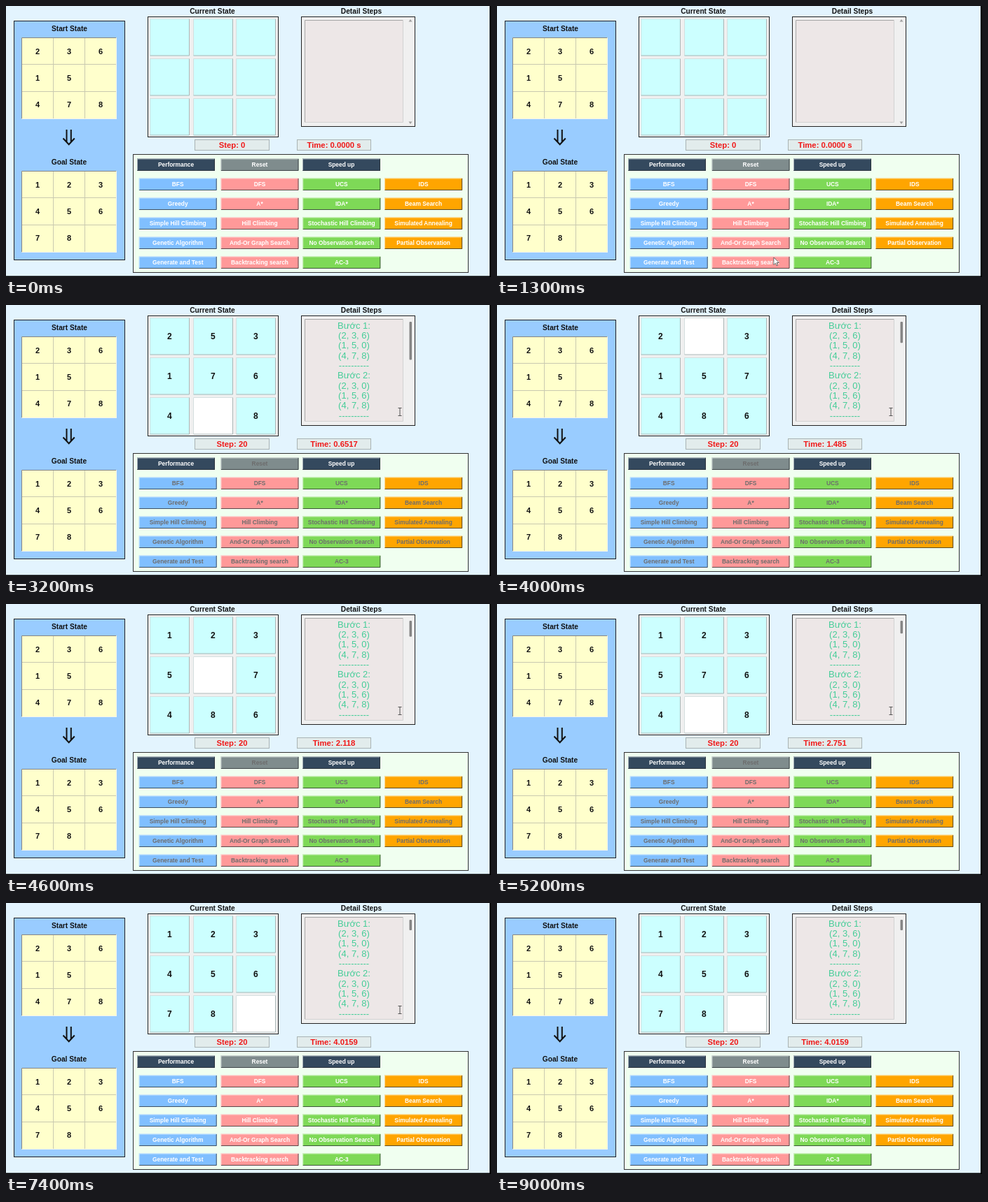
Animation of 692x388 px, one loop 9.2 s. Source, as an HTML page:

```html
<!DOCTYPE html>
<html lang="en">
<head>
<meta charset="utf-8">
<title>8-puzzle solver</title>
<style>
html, body { margin: 0; width: 100%; height: 100%; overflow: hidden; background: #e3f4fe; }
svg { display: block; width: 692px; height: 388px; }
text { font-family: "Liberation Sans", Arial, sans-serif; text-anchor: middle; font-weight: bold; white-space: pre; }
.plain { font-weight: normal; }
</style>
</head>
<body>
<svg id="stage" viewBox="0 0 692 388"></svg>
<script>
const NS = "http://www.w3.org/2000/svg";
const stage = document.getElementById("stage");
const LOOP = 9200, CLICK = 2000, DONE = 6500;

function add(tag, attrs, parent = stage) {
  const el = document.createElementNS(NS, tag);
  for (const name in attrs) el.setAttribute(name, attrs[name]);
  parent.appendChild(el);
  return el;
}
function box(x, y, width, height, fill, stroke) {
  return stroke
    ? add("rect", { x: x + .5, y: y + .5, width: width - 1, height: height - 1, fill, stroke })
    : add("rect", { x, y, width, height, fill });
}
function label(str, x, y, size, fill = "#111", parent = stage) {
  const el = add("text", { x, y: y + size * .36, "font-size": size, fill }, parent);
  el.textContent = str;
  return el;
}
function line(d, stroke, width = 1) {
  return add("path", { d, stroke, "stroke-width": width, fill: "none" });
}
// Two-tone edge: first colour top and left, second bottom and right.
function bevel(x, y, w, h, a, b) {
  const l = x + .5, t = y + .5, r = x + w - .5, u = y + h - .5;
  line(`M${l} ${u}V${t}H${r}`, a);
  line(`M${l} ${u}H${r}V${t}`, b);
}

box(0, 0, 692, 388, "#e3f4fe");
box(690, 0, 2, 388, "#000");
box(0, 386.5, 692, 1.5, "#000");

// Start and goal boards
function smallGrid(y, cells) {
  box(22, y, 136, 117, "#ffffcc");
  for (const x of [67.5, 112.5]) line(`M${x} ${y}v117`, "#c9c9b0");
  for (const dy of [38.5, 77.5]) line(`M22 ${y + dy}h136`, "#c9c9b0");
  bevel(22, y, 136, 117, "#858585", "#f4f4ee");
  cells.forEach((n, i) => {
    if (n) label(n, 45 + i % 3 * 45, y + 19.8 + Math.floor(i / 3) * 38.2, 11);
  });
}
const start = [2, 3, 6, 1, 5, 0, 4, 7, 8];
box(11, 21, 159, 343, "#99ccff", "#222");
label("Start State", 90.5, 32, 10.2);
smallGrid(45, start);
line("M86.5 177V194.5M92.8 177V194.5M81.5 189.5L89.7 198.3L97.8 189.5", "#111", 2);
label("Goal State", 90, 223.5, 10.2);
smallGrid(236, [1, 2, 3, 4, 5, 6, 7, 8, 0]);

// Current board
label("Current State", 294.5, 7.5, 10.2);
box(202, 15, 187, 173, "#f0f0f0", "#222");
const tiles = start.map((_, i) => {
  const x = [205, 267, 328][i % 3], y = 18 + Math.floor(i / 3) * 57;
  const face = box(x, y, 57, 53.5, "#ccffff");
  bevel(x, y, 57, 53.5, "#d5dfdf", "#a9b5b5");
  return { face, num: label("", x + 28.3, y + 26.7, 12) };
});

// Detail list
label("Detail Steps", 507, 7.5, 10.2);
box(421, 15, 163, 158, "#f0f0f0", "#222");
box(426, 20, 141, 147, "#ede7e7");
bevel(426, 20, 141, 147, "#a6a6a6", "#d2d2d2");
const arrows = add("path", { d: "M574.5 22.5L577 19L579.5 22.5ZM574.5 165.5L577 169L579.5 165.5Z", fill: "#a0a0a0" });
const thumb = add("rect", { x: 575.5, y: 24, width: 3.5, rx: 1, fill: "#858585" });
const blocks = [
  ["Bước 1:", "(2, 3, 6)", "(1, 5, 0)", "(4, 7, 8)", "----------"],
  ["Bước 2:", "(2, 3, 0)", "(1, 5, 6)", "(4, 7, 8)", "----------"]
].map((rows, b) => {
  const g = add("g", { class: "plain" });
  rows.forEach((s, i) =>
    label(s, 496.5, 29.2 + (b * 5 + i) * 14.3, 13, "#45cd98", g).classList.add("plain"));
  return g;
});

// Readouts
function readout(x, w) {
  box(x, 191, w, 16, "#e2ecec", "#a9b3b3");
  return label("", x + w / 2, 198.8, 11.3, "#f01818");
}
const stepText = readout(269, 107), timeText = readout(415, 106);

// Buttons
const lockable = [];
function button(str, x, y, fill, locks) {
  box(x, y, 111, 17.5, fill);
  bevel(x, y, 111, 17.5, "rgba(255,255,255,.55)", "rgba(40,45,50,.75)");
  const text = label(str, x + 55.5, y + 8.4, 8.4, "#fff");
  if (locks) lockable.push(text);
}
box(181, 212, 479, 170, "#f0fff0", "#333");
button("Performance", 187, 218.5, "#34495e");
button("Reset", 306.5, 218.5, "#7f8c8d", true);
button("Speed up", 423, 218.5, "#34495e");
[
  ["#80bfff", "BFS", "Greedy", "Simple Hill Climbing", "Genetic Algorithm", "Generate and Test"],
  ["#ff9999", "DFS", "A*", "Hill Climbing", "And-Or Graph Search", "Backtracking search"],
  ["#7ed957", "UCS", "IDA*", "Stochastic Hill Climbing", "No Observation Search", "AC-3"],
  ["#ffa500", "IDS", "Beam Search", "Simulated Annealing", "Partial Observation"]
].forEach(([fill, ...names], c) =>
  names.forEach((s, r) => button(s, 189.7 + c * 116.8, 246.5 + r * 28, fill, true)));

// Pointers
const hand = add("path", { d: "M0 0V10.5L2.5 8.3L4.2 12L5.8 11.2L4.2 7.6H7.4Z", fill: "#fff", stroke: "#333", "stroke-width": .7 });
const beam = add("path", { d: "M-2.5 -5.5H2.5M0 -5.5V5.5M-2.5 5.5H2.5", fill: "none", stroke: "#555" });

// Boards reached by sliding the blank
const shift = { U: -3, D: 3, L: -1, R: 1 };
const boards = [start];
for (const m of "ULDDRULULDRRDLULDRR") {
  const b = boards[boards.length - 1].slice();
  const i = b.indexOf(0), j = i + shift[m];
  [b[i], b[j]] = [b[j], b[i]];
  boards.push(b);
}
const moveAt = k => k ? 2400 + 200 * k + (k > 15 ? 100 : 0) : CLICK;

function along(points, v) {
  if (v <= points[0][0]) return points[0].slice(1);
  for (let i = 1; i < points.length; i++) {
    const a = points[i - 1], b = points[i];
    if (v <= b[0]) {
      const p = (v - a[0]) / (b[0] - a[0]);
      return a.slice(1).map((n, d) => n + (b[d + 1] - n) * p);
    }
  }
  return points[points.length - 1].slice(1);
}
const elapsed = [[1, .0172], [4, .6517], [8, 1.485], [14, 2.751], [18, 3.592], [19, 3.803]];
const route = [[900, 470, 374], [1300, 395, 360], [1600, 360.5, 338], [2500, 360.5, 338], [2750, 470, 235], [3000, 562, 153]];

function show(el, on) { el.setAttribute("visibility", on ? "visible" : "hidden"); }

function draw(t) {
  let k = -1;
  while (k + 1 < boards.length && t >= moveAt(k + 1)) k++;
  const busy = t >= CLICK && t < DONE;

  tiles.forEach(({ face, num }, i) => {
    const n = k < 0 ? "" : boards[k][i];
    face.setAttribute("fill", n === 0 ? "#fff" : "#ccffff");
    num.textContent = n || "";
  });
  blocks.forEach((g, i) => show(g, k >= i));
  show(arrows, k < 2);
  show(thumb, k >= 2);
  thumb.setAttribute("height", Math.max(15, 272 / (k + 1)));

  stepText.textContent = "Step: " + (k < 0 ? 0 : 20);
  timeText.textContent = "Time: " + (k < 1 ? "0.0000 s"
    : t >= DONE ? "4.0159"
    : Number(along(elapsed, k)[0].toFixed(k < 5 ? 4 : 3)));
  for (const el of lockable) el.setAttribute("fill", busy ? "#6d6d6d" : "#fff");

  const [x, y] = along(route, t);
  const inList = x > 426 && x < 567 && y > 20 && y < 167;
  show(hand, t >= 900 && t < 8000 && !inList);
  show(beam, t < 8000 && inList);
  for (const el of [hand, beam]) el.setAttribute("transform", `translate(${x} ${y})`);
}

const begin = performance.now();
function tick() {
  draw((performance.now() - begin) % LOOP);
  requestAnimationFrame(tick);
}
tick();
</script>
</body>
</html>
```
